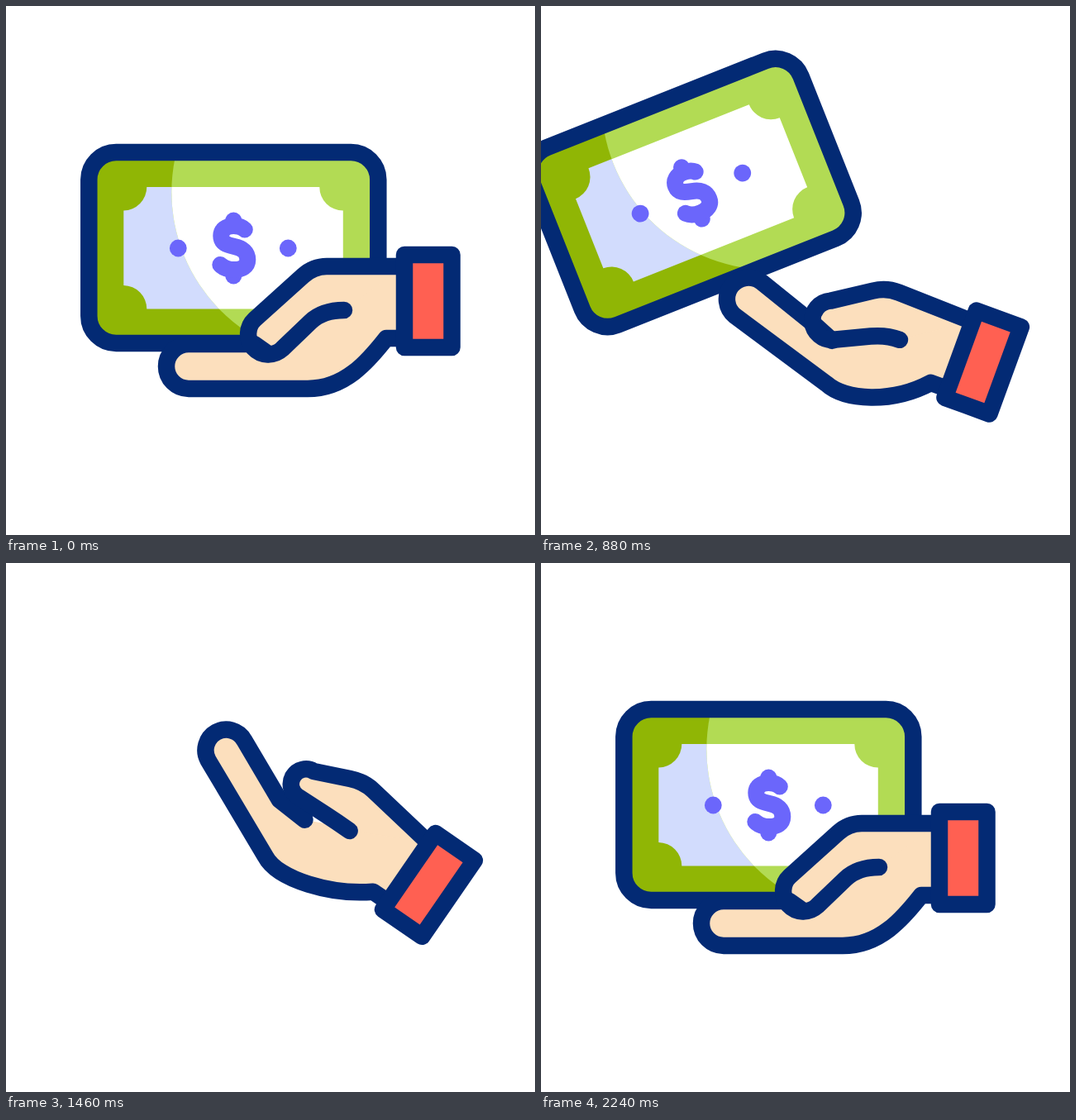
Recreate the animation shown at these times as an HTML page. Size 640 by 640 pixels, loop 2.4 s.

```html
<!DOCTYPE html>
<html lang="en">
<head>
<meta charset="utf-8">
<title>Payment</title>
<style>
  html, body { margin: 0; width: 100%; height: 100%; overflow: hidden; background: #fff; }
  svg { display: block; width: 100%; height: 100%; }
  .line { fill: none; stroke: #032a74; stroke-width: 20.5; stroke-linecap: round; stroke-linejoin: round; }
  .skin { fill: #fcdfbd; }
</style>
</head>
<body>
<svg viewBox="0 0 640 640">
  <defs>
    <clipPath id="glow"><circle cx="128" cy="-68" r="203"/></clipPath>
    <rect id="paper" x="-175" y="-116" width="350" height="231" rx="33"/>
    <path id="note" d="M-105-74H104A28.5 28.5 0 0 0 132.500-45.500V45A28.500 28.500 0 0 0 104 73.500H-105A28.500 28.500 0 0 0-133 45V-45.500A28.500 28.500 0 0 0-105-74Z"/>
  </defs>
  <g id="bill">
    <use href="#paper" fill="#90b605"/>
    <use href="#note" fill="#d2dcfd"/>
    <g clip-path="url(#glow)">
      <use href="#paper" fill="#b2db54"/>
      <use href="#note" fill="#fff"/>
    </g>
    <g fill="#6b66fb">
      <circle cx="-67" r="10.400"/>
      <circle cx="66" r="10.400"/>
      <circle cy="-33.500" r="10"/>
      <circle cy="33.500" r="10"/>
      <path fill="none" stroke="#6b66fb" stroke-width="20" stroke-linecap="round"
        d="M13.500-22.500C10-26 5-27 0-27C-9-27-15-22-15-15C-15-6-8-4 1-2C11 0 17 5 17 14C17 22 10 26 1 26C-7 26-12 24-16 20"/>
    </g>
    <use href="#paper" class="line"/>
  </g>
  <g id="hand">
    <path id="palmFill" class="skin"/>
    <path id="thumbFill" class="skin"/>
    <path id="palmLine" class="line"/>
    <path id="thumbLine" class="line"/>
    <rect x="-28.500" y="-56" width="57.500" height="112" fill="#ff6052"/>
    <rect x="-28.500" y="-56" width="57.500" height="112" class="line"/>
  </g>
</svg>
<script>
const LOOP = 2400;
const $ = id => document.getElementById(id);

// time, x, y, rotation
const billKeys = [
  [200, 275.3, 293, 0],
  [400, 275.3, 279, 0],
  [740, 248, 239, -12],
  [880, 183, 226.5, -21.6],
  [1040, 35, 213, -27],
  [1200, -228, 210, -28],
  [1440, -228, 150, -17],
  [1680, -15, 158, -15.8],
  [1960, 247, 191.3, -12.1],
  [2240, 275.3, 293, 0]
];

// time, x, y, rotation, finger bend, thumb bend
const handKeys = [
  [200, 510.5, 357, 0, 0, 0],
  [410, 571, 455.5, 3.2, .15, .1],
  [880, 534.5, 431, 20, 1, 1],
  [1220, 511.5, 416, 50.5, 2, 2],
  [1680, 511, 359, 14, .95, 1.5],
  [1960, 510.5, 325, .3, .04, .03],
  [2240, 510.5, 357, 0, 0, 0]
];

// Points relative to the cuff: open, half bent, fully bent
const fingerPoses = [
  [-193, 64, -210, 52, -289.5, 52, -289.5, 106, -145.5, 106, -100.5, 106, -72.5, 73],
  [-180, 38, -208, 26.7, -284.5, .8, -300.5, 50.3, -169.2, 89.2, -140.4, 101, -85.8, 84.4],
  [-158, 7.5, -205.5, 14.7, -282.3, -24.4, -307, 16.3, -190, 82, -157.4, 97.6, -88.7, 65]
];
const thumbPoses = [
  [-138.5, -42, -209.5, 22, -176.5, 58, -127.5, 11, -101.5, 11],
  [-140.3, -44.8, -198.7, -6.5, -178.9, 36.4, -120.8, 8.8, -103.7, 9],
  [-133.8, -62.2, -191.4, -39.8, -193.3, -6.3, -138.2, -2.2, -119, -1.8]
];

// Smooth interpolation without overshoot
function slope(keys, i, c) {
  if (i === 0 || i === keys.length - 1) return 0;
  const rate = j => (keys[j + 1][c] - keys[j][c]) / (keys[j + 1][0] - keys[j][0]);
  const a = rate(i - 1), b = rate(i);
  return a * b > 0 ? 2 * a * b / (a + b) : 0;
}

function sample(keys, t) {
  const last = keys.length - 1;
  if (t <= keys[0][0]) return keys[0].slice(1);
  if (t >= keys[last][0]) return keys[last].slice(1);
  const i = keys.findIndex(k => k[0] > t) - 1;
  const k = keys[i], n = keys[i + 1], h = n[0] - k[0], s = (t - k[0]) / h;
  const e = s * s * (3 - 2 * s);
  return k.slice(1).map((v, j) => {
    const c = j + 1;
    return v + (n[c] - v) * e
      + h * s * (1 - s) * ((1 - s) * slope(keys, i, c) - s * slope(keys, i + 1, c));
  });
}

// Blend three poses along a parabola, return [x, y] pairs
function blend([a, b, c], p) {
  const wa = (1 - p) * (2 - p) / 2, wb = p * (2 - p), wc = p * (p - 1) / 2;
  const v = a.map((x, i) => x * wa + b[i] * wb + c[i] * wc);
  return v.filter((_, i) => i % 2 === 0).map((x, i) => [x, v[2 * i + 1]]);
}

const mix = (a, b, k) => [a[0] + (b[0] - a[0]) * k, a[1] + (b[1] - a[1]) * k];

function toward(a, b, d) {
  return mix(a, b, d / Math.hypot(b[0] - a[0], b[1] - a[1]));
}

function place(id, [x, y, r]) {
  $(id).setAttribute('transform', `translate(${x} ${y}) rotate(${r})`);
}

function drawHand(bend, thumbBend) {
  const [heel, base, top, under, knuckle, c1, c2] = blend(fingerPoses, bend);
  const palm = `M${heel}L${base}L${top}A1 1 0 0 0 ${under}L${knuckle}C${c1} ${c2} -50.5 45L-30 45`;
  $('palmLine').setAttribute('d', palm);
  $('palmFill').setAttribute('d', palm + 'L-30 -42Z');

  const wrist = [-30, -42];
  const [bow, tip, pad, fold, end] = blend(thumbPoses, thumbBend);
  const thumb = `M${wrist}L${toward(bow, wrist, 16)}Q${bow} ${toward(bow, tip, 17)}`
    + `L${tip}A1 1 0 0 0 ${pad}L${mix(pad, fold, .7)}Q${fold} ${end}`;
  $('thumbLine').setAttribute('d', thumb);
  $('thumbFill').setAttribute('d', thumb + 'Z');
}

const start = performance.now();
function frame() {
  const t = Math.max(0, performance.now() - start) % LOOP;
  const hand = sample(handKeys, t);
  place('bill', sample(billKeys, t));
  place('hand', hand);
  drawHand(hand[3], hand[4]);
  requestAnimationFrame(frame);
}
frame();
</script>
</body>
</html>
```
